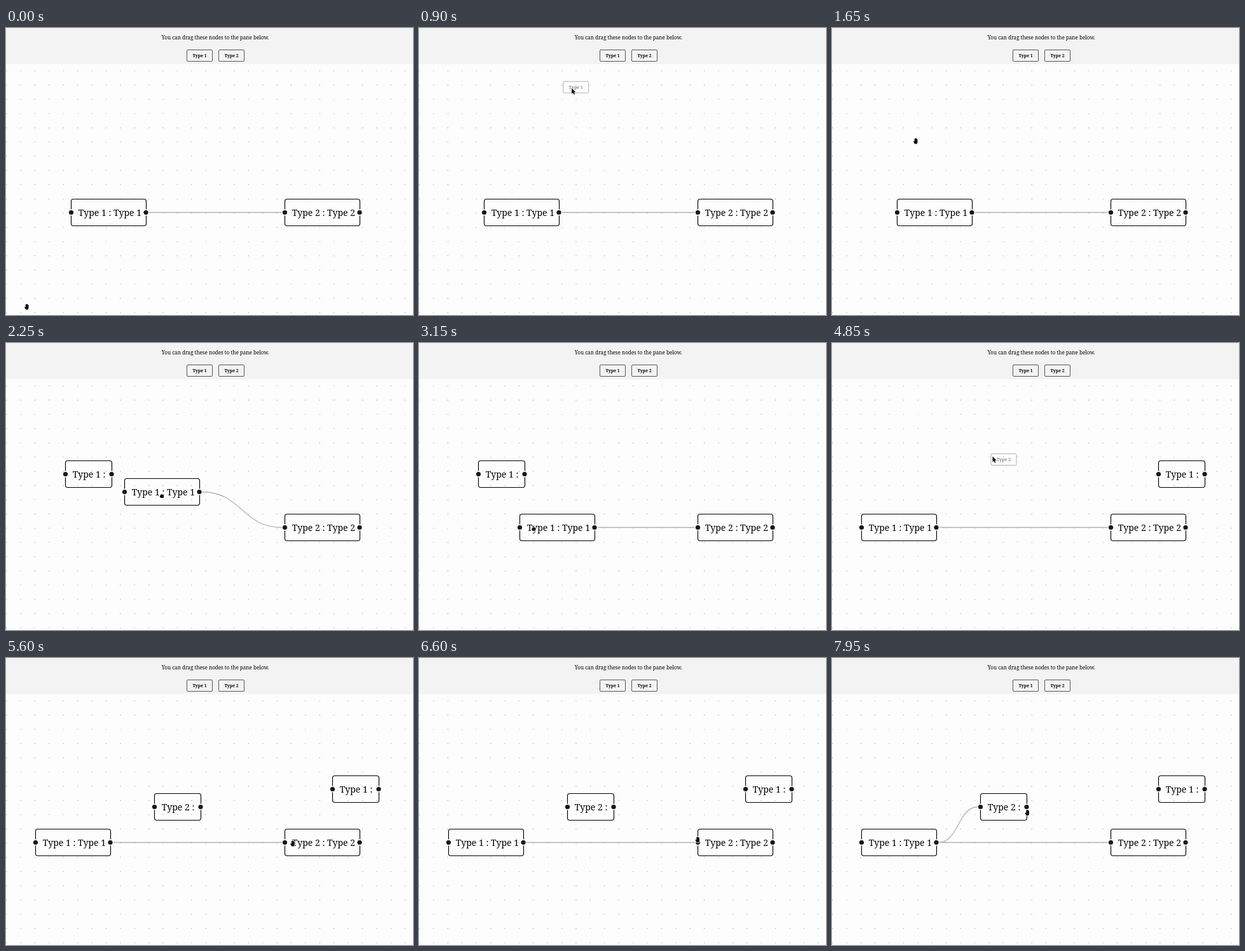
An HTML page with a canvas that plays this animation: 640 by 452 pixels, repeating every 8 s.

```html
<!DOCTYPE html>
<html lang="en">
<head>
<meta charset="utf-8">
<title>Node editor</title>
<style>
  html, body { margin: 0; width: 640px; height: 452px; overflow: hidden; }
  canvas { display: block; }
</style>
</head>
<body>
<canvas id="stage" width="640" height="452"></canvas>
<script>
const ctx = document.getElementById('stage').getContext('2d');
const LOOP = 8000, STEP = 50, SNAP = 28;
const INK = '#15161f', EDGE = '#b1b1b7', PANE = '#fdfdfd';

// Pointer moves: [start, end, x, y]; it rests between them.
const moves = [
  [0, 0, 32.5, 439],
  [0, 650, 311, 51],         // to the first button
  [750, 1100, 131, 162],     // drag it out
  [1300, 1650, 131.5, 178],
  [1650, 1850, 163, 288],    // to the first node
  [1950, 2250, 245, 241],    // drag it around
  [2250, 2500, 301, 241],
  [2500, 2800, 300, 294],
  [2850, 3380, 100, 292],
  [3380, 3520, 113, 146],    // to the dropped node
  [3520, 3700, 120, 195],
  [3700, 4100, 540, 207],    // drag it right
  [4200, 4600, 337, 43],     // to the second button
  [4600, 4850, 252.5, 178.5],
  [5000, 5650, 454, 294],
  [5650, 5750, 438, 291],
  [5950, 6600, 438, 286],
  [6600, 6850, 163, 290],    // pull a new edge
  [7250, 7600, 233, 237],
  [7650, 7950, 307, 243.5]
];
const firstDrag = { x: 102, y: 269, from: 1950, to: 3380 };
const droppedDrag = { x: 93, y: 185, from: 3700, to: 4100 };

const clamp = (v, lo, hi) => Math.min(hi, Math.max(lo, v));
const within = (t, from, to) => t >= from && t < to;

function pointer(t) {
  let [, , x, y] = moves[0];
  for (const [start, end, toX, toY] of moves.slice(1)) {
    const p = clamp((t - start) / (end - start), 0, 1), ease = p * p * (3 - 2 * p);
    x += (toX - x) * ease;
    y += (toY - y) * ease;
  }
  return [x, y];
}

// A dragged node follows the pointer one step late, on the snap grid.
function dragged({ x, y, from, to }, t) {
  const grab = pointer(from), now = pointer(clamp(t - STEP, from, to));
  const snap = i => SNAP * Math.round((now[i] - grab[i]) / SNAP);
  return [x + snap(0), y + snap(1)];
}

function text(label, x, y, size, align = 'center', weight = '') {
  ctx.font = `${weight} ${size}px "Noto Serif", serif`;
  ctx.textAlign = align;
  ctx.fillStyle = '#000';
  ctx.fillText(label, x, y);
}

function box(x, y, w, h, r, color, width) {
  ctx.beginPath();
  ctx.roundRect(x + .5, y + .5, w, h, r);
  ctx.strokeStyle = color;
  ctx.lineWidth = width;
  ctx.stroke();
}

function disc(x, y, r, color) {
  ctx.beginPath();
  ctx.arc(x, y, r, 0, 7);
  ctx.fillStyle = color;
  ctx.fill();
}

function button(label, x, y, alpha = 1) {
  ctx.globalAlpha = alpha;
  box(x, y, 40, 18, 1.5, '#444', .9);
  text(label, x + 20.5, y + 12, 6.8, 'center', 'bold');
  ctx.globalAlpha = 1;
}

function node(label, [x, y], w) {
  box(x, y, w, 42, 3.5, '#000', 1.15);
  text(label, x + 11.7, y + 27, 14, 'left');
  for (const hx of [x + .5, x + w]) {
    disc(hx, y + 21.5, 4.9, PANE);
    disc(hx, y + 21.5, 3.6, INK);
  }
}

function edge(x1, y1, x2, y2) {
  const mid = (x1 + x2) / 2;
  ctx.beginPath();
  ctx.moveTo(x1, y1);
  ctx.bezierCurveTo(mid, y1, mid, y2, x2, y2);
  ctx.strokeStyle = EDGE;
  ctx.lineWidth = 1.3;
  ctx.stroke();
}

const shapes = {
  arrow: new Path2D('M0 0V9L2 7.2L3.5 10.2L5 9.5L3.6 6.6H6.2Z'),
  hand: new Path2D('M-1.5 4.5L-3.6 .8L-2.6 0L-1.8 .8V-3.4L-.8 -3.9L0 -4.4L1 -4L2 -3.4L3 -2.4V2L2.2 4.5Z'),
  fist: new Path2D('M-2 3L-3.4 .6L-2.6 -.4L-1.8 -2.2L0 -2.7L2 -2.2L3.2 -1.2V1.4L2.4 3Z')
};

function cursor(kind, [x, y]) {
  ctx.save();
  ctx.translate(x, y);
  ctx.lineJoin = 'round';
  ctx.strokeStyle = '#fff';
  ctx.lineWidth = 1.6;
  ctx.stroke(shapes[kind]);
  ctx.fillStyle = '#111';
  ctx.fill(shapes[kind]);
  ctx.restore();
}

function backdrop() {
  ctx.fillStyle = PANE;
  ctx.fillRect(0, 0, 640, 452);
  for (let y = 67.6; y < 452; y += 22.4)
    for (let x = .6; x < 640; x += 22.4) disc(x, y, .7, '#aaa');
}

function toolbar() {
  ctx.fillStyle = '#f3f3f3';
  ctx.fillRect(0, 0, 640, 57);
  text('You can drag these nodes to the pane below.', 329.3, 17.8, 8.08);
  button('Type 1', 284, 34);
  button('Type 2', 334, 34);
}

function draw(t) {
  const hand = pointer(t), first = dragged(firstDrag, t);
  const dragOne = within(t, 600, 1350), dragTwo = within(t, 4600, 5050);
  const dragNode = [firstDrag, droppedDrag].some(d => within(t, d.from + STEP, d.to + STEP));

  backdrop();
  edge(first[0] + 122, first[1] + 21.5, 434, 290.5);
  if (within(t, 7300, 7650)) edge(168, 290.5, ...hand);
  if (t >= 7650) edge(168, 290.5, 229, 234.5);

  node('Type 2 : Type 2', [438, 269], 118);
  if (t >= 1700) node('Type 1 :', dragged(droppedDrag, t), 73);
  if (t >= 5400) node('Type 2 :', [233, 213], 73);
  node('Type 1 : Type 1', first, 118);
  toolbar();

  if (dragOne) button('Type 1', hand[0] - 14, hand[1] - 11, .45);
  if (dragTwo) button('Type 2', hand[0] - 3, hand[1] - 4.5, .45);
  cursor(dragOne || dragTwo ? 'arrow' : dragNode ? 'fist' : 'hand', hand);
}

const start = performance.now();
function tick() {
  const t = (performance.now() - start) % LOOP;
  draw(Math.floor(t / STEP) * STEP);
  requestAnimationFrame(tick);
}
tick();
</script>
</body>
</html>
```
